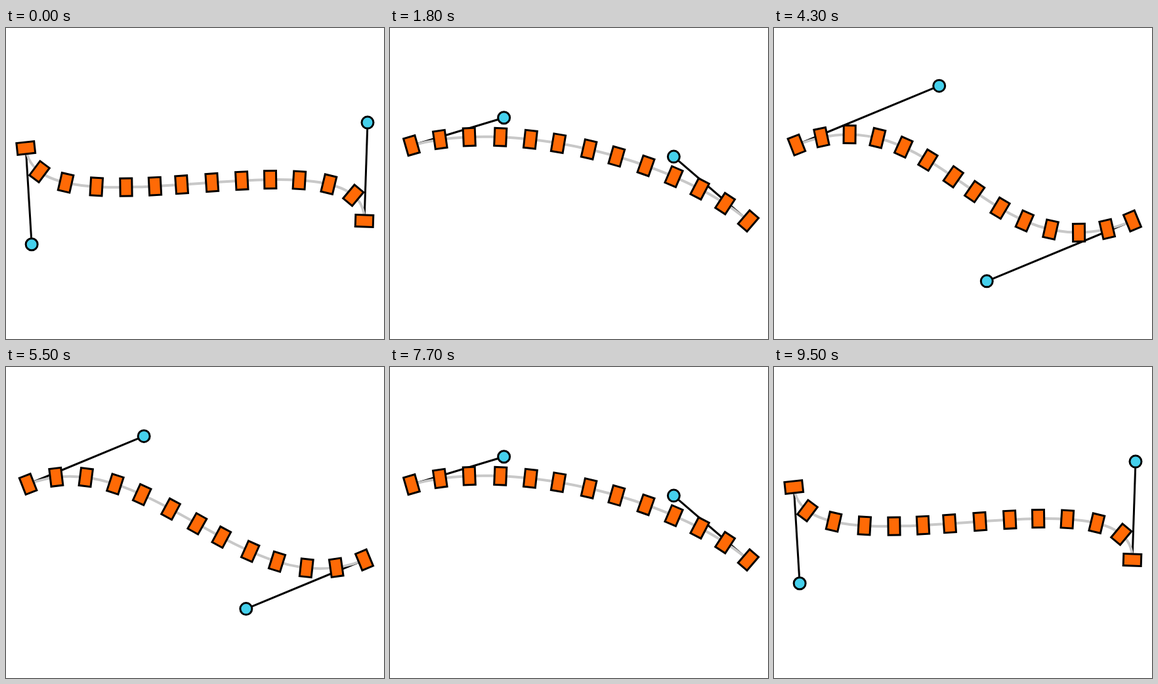
Animation of 576x474 px, one loop 9600 ms. Source, as an HTML page with a canvas:

```html
<!DOCTYPE html>
<html lang="en">
<head>
<meta charset="utf-8">
<title>Boxes along a curve</title>
<style>
html, body { margin: 0; width: 100%; height: 100%; overflow: hidden; background: #fff; }
canvas { display: block; }
</style>
</head>
<body>
<canvas id="stage" width="576" height="474"></canvas>
<script>
const ctx = document.getElementById('stage').getContext('2d');
const START = { x: 30, y: 180 };
const END = { x: 546, y: 294 };
const SAMPLES = 150;
const SPACING = 42.5;
const STEP_MS = 100;
const STEPS = 48;

const lerp = (a, b, t) => a + (b - a) * t;

function polar(origin, degrees, length) {
  const a = degrees * Math.PI / 180;
  return { x: origin.x + length * Math.cos(a), y: origin.y + length * Math.sin(a) };
}

// The handles swing, then shrink to nothing, then grow in opposite directions.
function handlesAt(step) {
  const swing = Math.min(step / 19, 1);
  const growing = step >= 30;
  const length = growing ? 15 * (step - 27) : 150 - 15 * Math.max(0, step - 19);
  return [
    polar(START, lerp(86.5, -22.5, swing), length),
    polar(END, growing ? 157.5 : lerp(-88.1, -142.1, swing), length)
  ];
}

function bezierPoint(p, t) {
  const u = 1 - t;
  const along = k => u * u * u * p[0][k] + 3 * u * u * t * p[1][k] +
    3 * u * t * t * p[2][k] + t * t * t * p[3][k];
  return { x: along('x'), y: along('y') };
}

function bezierAngle(p, t) {
  // Stay just inside the end, where a zero-length handle has no direction.
  t = Math.min(t, 0.9999);
  const u = 1 - t;
  const slope = k => u * u * (p[1][k] - p[0][k]) + 2 * u * t * (p[2][k] - p[1][k]) +
    t * t * (p[3][k] - p[2][k]);
  return Math.atan2(slope('y'), slope('x'));
}

function drawHandle(anchor, tip) {
  ctx.strokeStyle = '#000';
  ctx.lineWidth = 3;
  ctx.beginPath();
  ctx.moveTo(anchor.x, anchor.y);
  ctx.lineTo(tip.x, tip.y);
  ctx.stroke();
  ctx.fillStyle = '#45d0ec';
  ctx.beginPath();
  ctx.arc(tip.x, tip.y, 9, 0, 2 * Math.PI);
  ctx.fill();
  ctx.stroke();
}

function drawCurve(p) {
  ctx.strokeStyle = '#c8c8c8';
  ctx.lineWidth = 4;
  ctx.beginPath();
  ctx.moveTo(p[0].x, p[0].y);
  ctx.bezierCurveTo(p[1].x, p[1].y, p[2].x, p[2].y, p[3].x, p[3].y);
  ctx.stroke();
}

function drawBox(center, angle) {
  ctx.save();
  ctx.translate(center.x, center.y);
  ctx.rotate(angle);
  ctx.fillStyle = '#ff6a06';
  ctx.strokeStyle = '#000';
  ctx.lineWidth = 3;
  ctx.beginPath();
  ctx.rect(-9, -13.5, 18, 27);
  ctx.fill();
  ctx.stroke();
  ctx.restore();
}

// Each box sits on the first sample beyond its share of the arc length.
function drawBoxes(p) {
  const points = [], lengths = [];
  for (let i = 0; i <= SAMPLES; i++) {
    const q = bezierPoint(p, i / SAMPLES);
    const prev = points[i - 1];
    points.push(q);
    lengths.push(prev ? lengths[i - 1] + Math.hypot(q.x - prev.x, q.y - prev.y) : 0);
  }
  const total = lengths[SAMPLES];
  const gaps = Math.floor(total / SPACING);
  for (let i = 0; i <= gaps; i++) {
    const goal = total * i / gaps + 1e-6;
    const found = lengths.findIndex(l => l > goal);
    const k = found < 0 ? SAMPLES : found;
    drawBox(points[k], bezierAngle(p, k / SAMPLES));
  }
}

function draw(ms) {
  const tick = Math.floor(ms / STEP_MS) % (2 * STEPS);
  const step = Math.min(tick, 2 * STEPS - 1 - tick);
  const [first, second] = handlesAt(step);
  const curve = [START, first, second, END];
  ctx.fillStyle = '#fff';
  ctx.fillRect(0, 0, 576, 474);
  drawHandle(START, first);
  drawHandle(END, second);
  drawCurve(curve);
  drawBoxes(curve);
}

const begin = performance.now();
function loop() {
  draw(performance.now() - begin);
  requestAnimationFrame(loop);
}
loop();
</script>
</body>
</html>
```
